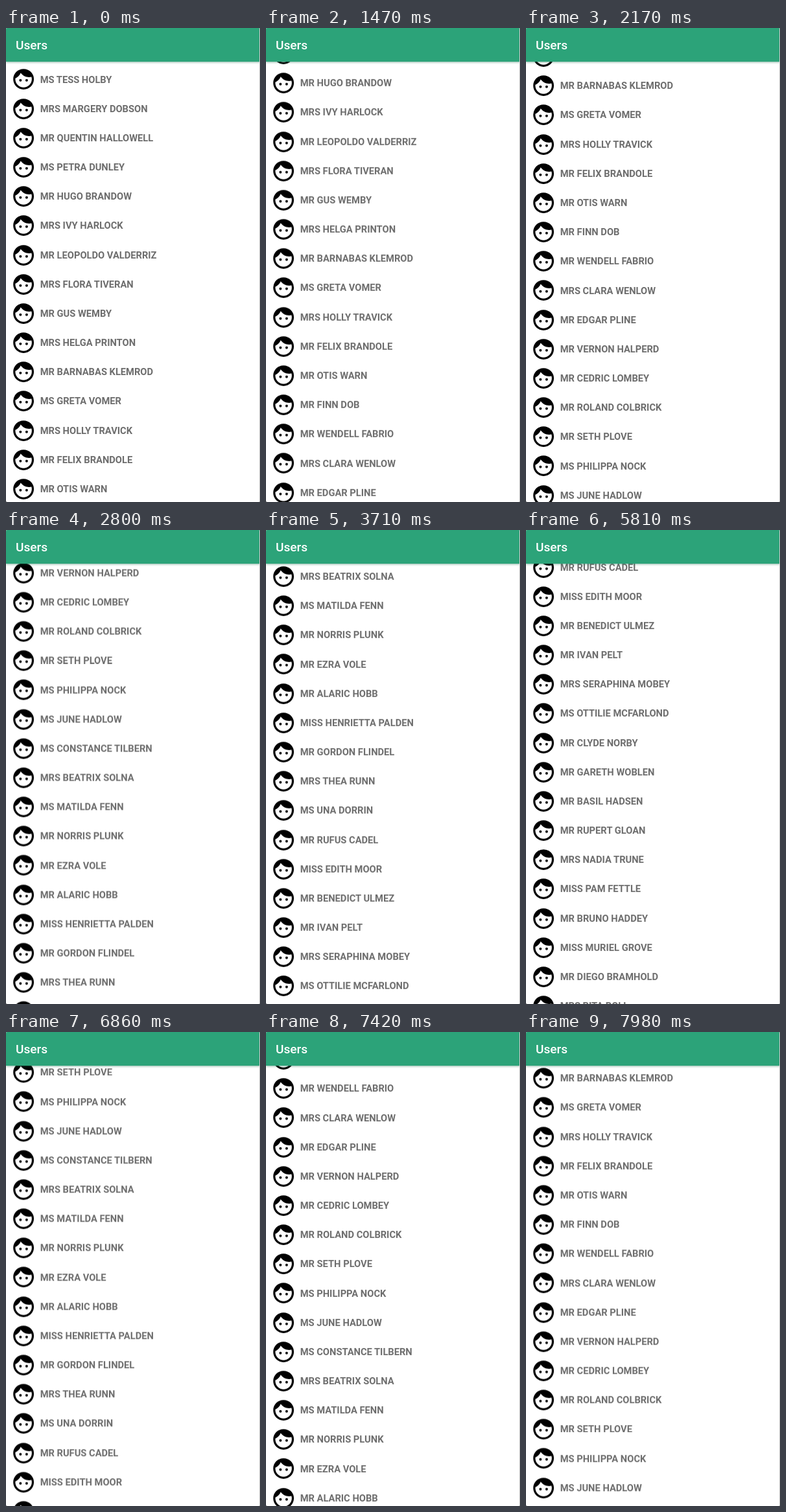
An HTML page for the animation above (8 s loop, 392x732 px).

```html
<!DOCTYPE html>
<html lang="en">
<head>
<meta charset="utf-8">
<title>Users</title>
<style>
  html, body { margin: 0; width: 100%; height: 100%; overflow: hidden; }
  html { background: #666; }
  body { position: relative; background: #fff; border-radius: 2px; font-family: Roboto, sans-serif; }
  header {
    position: absolute; inset: 0 0 auto; height: 52px; padding-left: 15px;
    background: #2ca379; color: #fff; font: 500 19.1px/54px Roboto, sans-serif;
    box-shadow: 0 1px 3px rgba(30, 110, 80, .5);
  }
  #list { position: absolute; top: 56.7px; left: 0; right: 0; will-change: transform; }
  .row {
    display: flex; align-items: center; height: 45.18px; padding-left: 7.5px;
    color: #6d6d6d; font-size: 14.7px; font-weight: 700; white-space: nowrap;
  }
  .row svg { width: 38.2px; height: 38.2px; margin-right: 7px; flex: none; }
  .edge { position: absolute; inset: 0 0 0 auto; width: 1px; background: #c8c8c8; }
</style>
</head>
<body>
<svg width="0" height="0" style="position:absolute">
  <symbol id="face" viewBox="0 0 24 24">
    <circle cx="12" cy="12" r="10"/>
    <path fill="#fff" d="M12 20c-4.41 0-8-3.59-8-8 0-.29.02-.58.05-.86 2.36-1.05 4.23-2.98 5.21-5.37C11.07 8.33 14.05 10 17.42 10c.78 0 1.53-.09 2.25-.26.21.71.33 1.47.33 2.26 0 4.41-3.59 8-8 8z"/>
    <circle cx="9" cy="13" r="1.25"/>
    <circle cx="15" cy="13" r="1.25"/>
  </symbol>
</svg>
<div id="list"></div>
<header>Users</header>
<div class="edge"></div>
<script>
const users = `MS TESS HOLBY,MRS MARGERY DOBSON,MR QUENTIN HALLOWELL,MS PETRA DUNLEY,MR HUGO BRANDOW,
MRS IVY HARLOCK,MR LEOPOLDO VALDERRIZ,MRS FLORA TIVERAN,MR GUS WEMBY,MRS HELGA PRINTON,
MR BARNABAS KLEMROD,MS GRETA VOMER,MRS HOLLY TRAVICK,MR FELIX BRANDOLE,MR OTIS WARN,
MR FINN DOB,MR WENDELL FABRIO,MRS CLARA WENLOW,MR EDGAR PLINE,MR VERNON HALPERD,
MR CEDRIC LOMBEY,MR ROLAND COLBRICK,MR SETH PLOVE,MS PHILIPPA NOCK,MS JUNE HADLOW,
MS CONSTANCE TILBERN,MRS BEATRIX SOLNA,MS MATILDA FENN,MR NORRIS PLUNK,MR EZRA VOLE,
MR ALARIC HOBB,MISS HENRIETTA PALDEN,MR GORDON FLINDEL,MRS THEA RUNN,MS UNA DORRIN,
MR RUFUS CADEL,MISS EDITH MOOR,MR BENEDICT ULMEZ,MR IVAN PELT,MRS SERAPHINA MOBEY,
MS OTTILIE MCFARLOND,MR CLYDE NORBY,MR GARETH WOBLEN,MR BASIL HADSEN,MR RUPERT GLOAN,
MRS NADIA TRUNE,MISS PAM FETTLE,MR BRUNO HADDEY,MISS MURIEL GROVE,MR DIEGO BRAMHOLD,
MRS RITA BOLL,MS CELESTE HARDWIN,MISS DELLA WINDON,MR SIMON PADLER,MR ERNST DROMEL,
MRS MARLENE KLAUBEN,MR AUGUST HOLDEN,MS BRENDA FOLSY,MR CASPER LINDOW,MRS PAULA GRENTON,
MR NEVILLE TASK`.split(/,\s*/);

const list = document.getElementById('list');
list.innerHTML = users.map(name =>
  `<div class="row"><svg><use href="#face"/></svg>${name}</div>`).join('');

const LOOP = 8000, STEP = 70;

// Each swipe: start ms, end ms, scroll offset at its end.
const swipes = [
  [1190, 2170, 442], [2170, 3150, 988], [3150, 4200, 1273], [4200, 5180, 2035],
  [5250, 6090, 1500], [6230, 7140, 910], [7140, 8050, 450]
];

function scrollAt(time) {
  let offset = 0;
  for (const [start, end, target] of swipes) {
    if (time <= start) break;
    const left = Math.max(0, (end - time) / (end - start));
    offset = target + (offset - target) * left ** 1.5;
  }
  return offset;
}

function draw() {
  const time = performance.now() % LOOP;
  const held = Math.floor(time / STEP) * STEP;
  list.style.transform = `translateY(${-scrollAt(held).toFixed(2)}px)`;
  requestAnimationFrame(draw);
}
draw();
</script>
</body>
</html>
```
